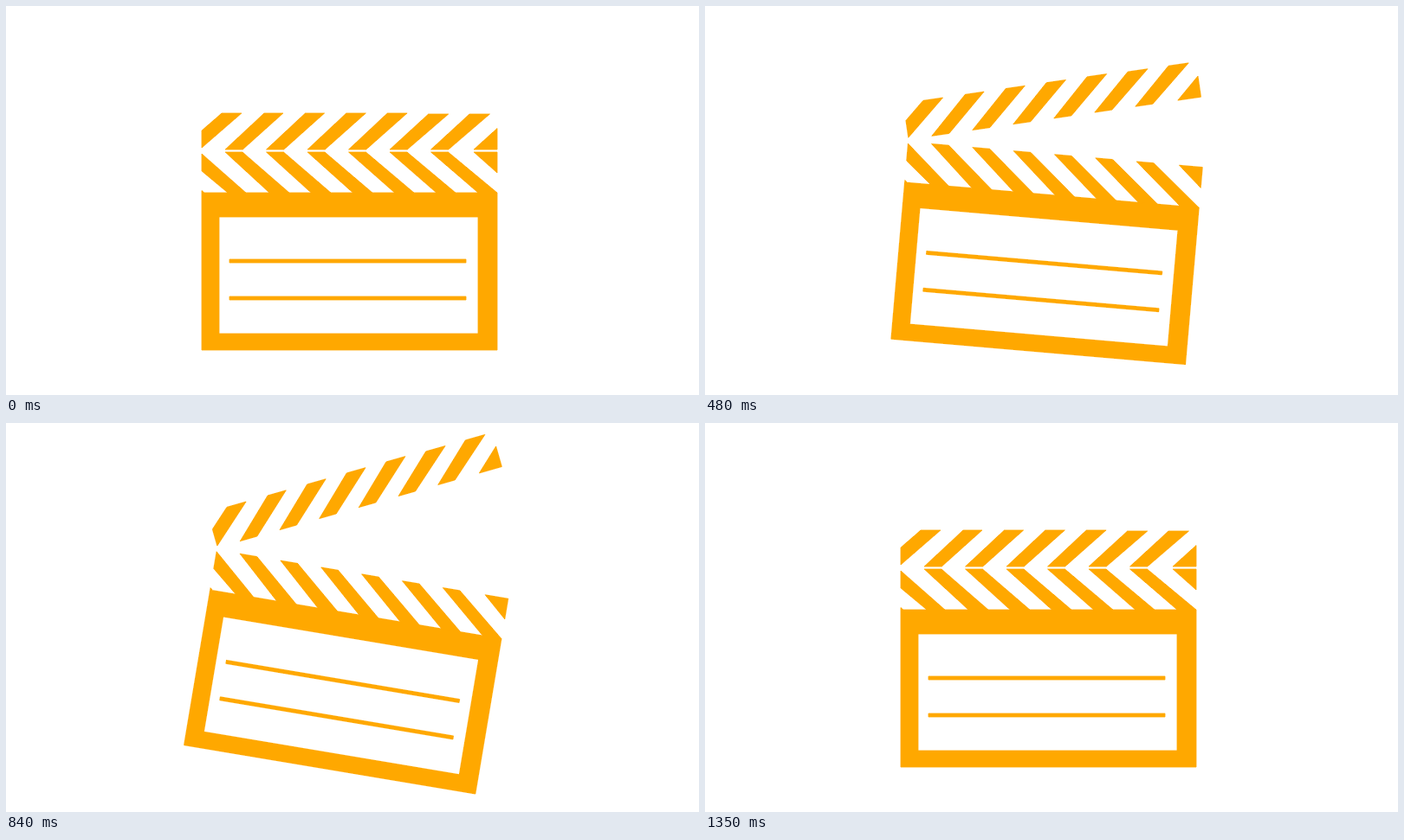
Animation, 800 px wide and 450 px high, one loop 2.7 s. Source, as an HTML page:

```html
<!DOCTYPE html>
<html>
<head>
<meta charset="utf-8">
<title>Clapperboard</title>
<style>
  html, body { margin: 0; width: 100%; height: 100%; overflow: hidden; background: #fff; }
  svg { display: block; width: 100%; height: 100%; }
</style>
</head>
<body>
<svg viewBox="0 0 800 450" fill="#ffa800" stroke="#ffa800" stroke-width=".8"
     stroke-linejoin="round" shape-rendering="crispEdges">
  <g id="board">
    <path fill-rule="evenodd" d="M226 213.5L229 216H567V398H226ZM246 244V379H545V244Z"/>
    <path d="M258 293H531V297H258ZM258 336H531V340H258Z"/>
    <path id="lower"/>
    <path id="lid"/>
  </g>
</svg>
<script>
const LOOP = 2700, STEP = 30;
const OPENED = 967, CLOSING = 1025, CLOSED = 1340;
const [board, lower, lid] = ['board', 'lower', 'lid'].map(id => document.getElementById(id));

// Six slanted bars between two edges
function bars(bar) {
  return Array.from({ length: 6 }, (_, k) => bar(k)).join('');
}

lid.setAttribute('d',
  'M226 144L249 124H272L226 164Z' +
  bars(k => {
    const x = 253 + 47.5 * k, y = k < 4 ? 124 : 125;
    return `M${x} 166H${x + 20.3}L${320 + 47.7 * k} ${y}H${298 + 47.4 * k}Z`;
  }) +
  'M540 166L567 141.5V166Z');

lower.setAttribute('d',
  'M226 171L277 216H256L226 191Z' +
  bars(k => {
    const x = 253 + 47.5 * k;
    return `M${x} 169H${x + 20}L${327 + 48 * k} 216H${304 + 48.2 * k}Z`;
  }) +
  'M540 169H567V193Z');

function ease(t, start, end) {
  const x = Math.min(1, Math.max(0, (t - start) / (end - start)));
  return x * x * (3 - 2 * x);
}

function draw(now) {
  const t = Math.floor(now % LOOP / STEP) * STEP;
  const open = ease(t, 0, OPENED) - ease(t, CLOSING, CLOSED);
  board.setAttribute('transform', `rotate(${10 * open} 368 262.5)`);
  lid.setAttribute('transform', `rotate(${-26.7 * open} 226.5 165)`);
}

let start;
function tick(now) {
  start ??= now;
  draw(now - start);
  requestAnimationFrame(tick);
}
draw(0);
requestAnimationFrame(tick);
</script>
</body>
</html>
```
